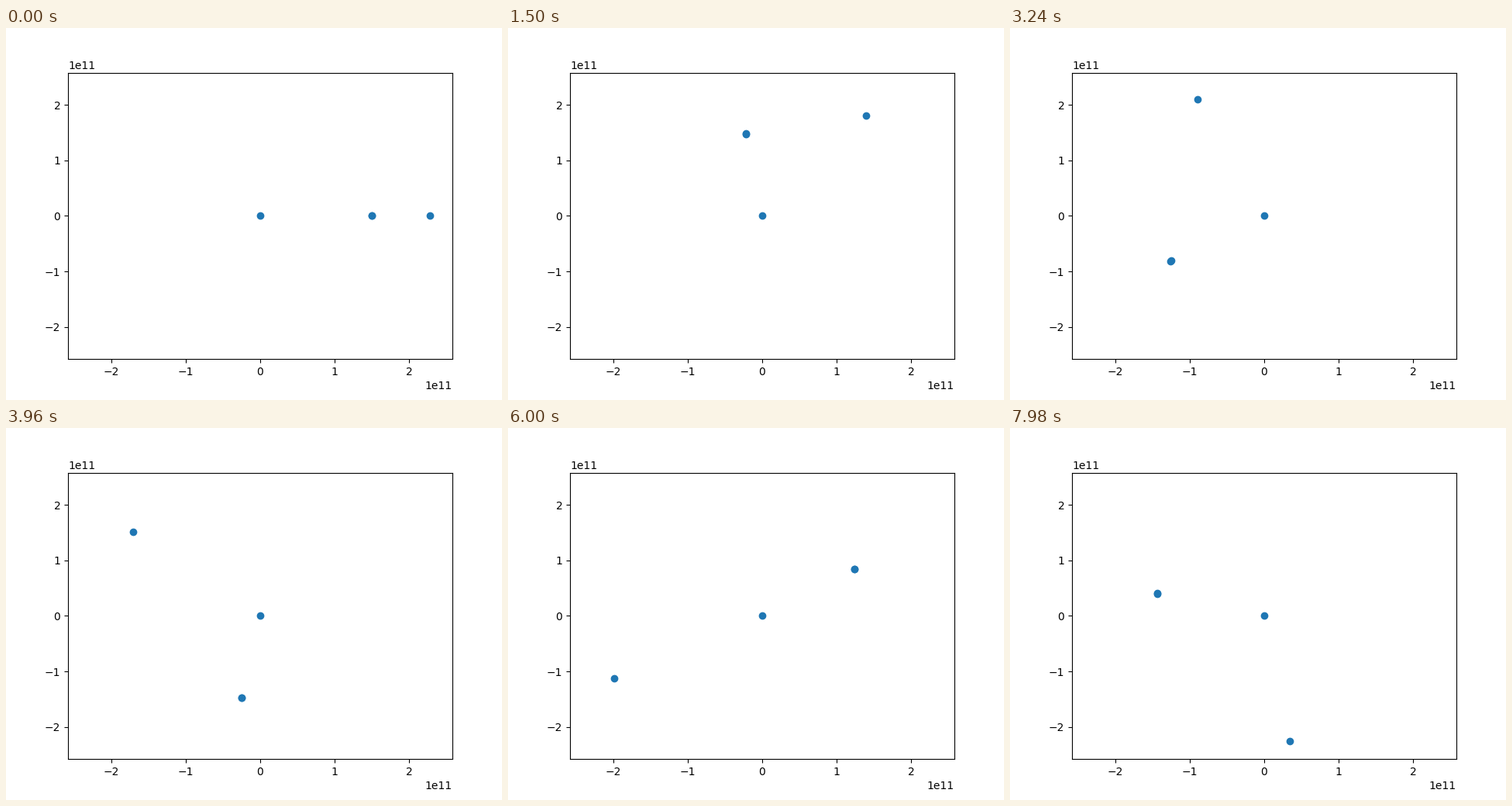
A matplotlib script for the animation above (8 s loop, 640 px wide and 480 px high).

```python
import numpy as np
import matplotlib.pyplot as plt
from matplotlib.animation import FuncAnimation

LOOP_MS = 8000
FRAMES = 267
LIMIT = 2.58e11

# orbit radius in metres, degrees travelled per frame
EARTH = (1.496e11, 1.9713)
MARS = (2.28e11, 1.048)
MOON = (3.844e8, 27.1)


def orbit(body, step):
    radius, rate = body
    angle = np.radians(rate * step)
    return radius * np.array([np.cos(angle), np.sin(angle)])


def positions(step):
    sun = np.zeros(2)
    earth = orbit(EARTH, step)
    moon = earth + orbit(MOON, step)
    return np.column_stack([sun, earth, moon, orbit(MARS, step)])


fig, ax = plt.subplots(figsize=(6.4, 4.8), dpi=100)
ax.set_xlim(-LIMIT, LIMIT)
ax.set_ylim(-LIMIT, LIMIT)
dots, = ax.plot(*positions(0), "o", color="tab:blue", markersize=6)


def update(step):
    dots.set_data(*positions(step))
    return dots,


anim = FuncAnimation(fig, update, frames=FRAMES, interval=LOOP_MS / FRAMES,
                     init_func=lambda: update(0), repeat=True, repeat_delay=0)
plt.show()
```
